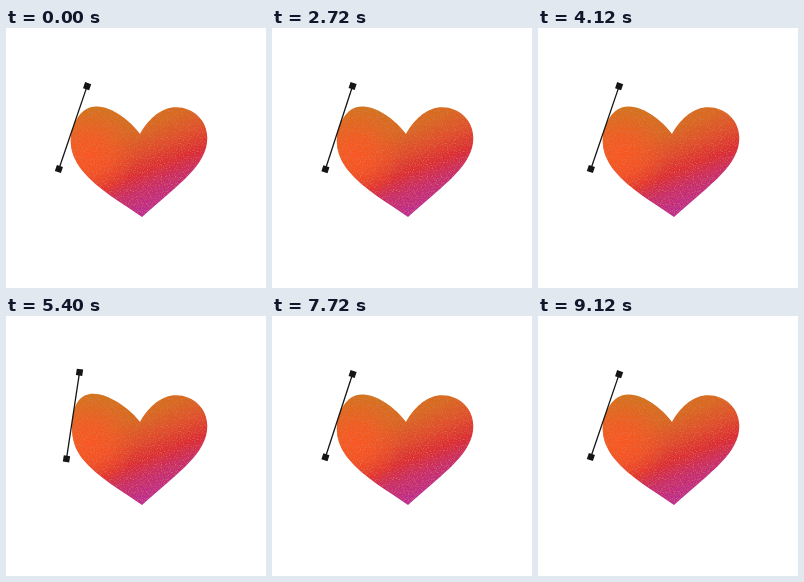
An HTML page that plays this animation: 260x260 px, repeating every 10000 ms.

```html
<!DOCTYPE html>
<html lang="en">
<head>
<meta charset="utf-8">
<title>Heart curve handle</title>
<style>
html, body { margin: 0; width: 100%; height: 100%; overflow: hidden; background: #fff; }
svg { display: block; width: 100vw; height: 100vh; }
</style>
</head>
<body>
<svg viewBox="0 0 260 260">
  <defs>
    <linearGradient id="warm" gradientUnits="userSpaceOnUse" x1="110" y1="72" x2="153.7" y2="181.7">
      <stop offset="0" stop-color="#d2741a"/>
      <stop offset=".3" stop-color="#d8691e"/>
      <stop offset=".48" stop-color="#e04e28"/>
      <stop offset=".65" stop-color="#dc2c32"/>
      <stop offset=".8" stop-color="#c82c6c"/>
      <stop offset="1" stop-color="#bb2c98"/>
    </linearGradient>
    <radialGradient id="glow" gradientUnits="userSpaceOnUse" cx="82" cy="127" r="48">
      <stop offset="0" stop-color="#ff5420" stop-opacity=".9"/>
      <stop offset=".4" stop-color="#ff5420" stop-opacity=".65"/>
      <stop offset="1" stop-color="#ff5420" stop-opacity="0"/>
    </radialGradient>
    <filter id="noise" x="0" y="0" width="1" height="1" color-interpolation-filters="sRGB">
      <feTurbulence type="fractalNoise" baseFrequency=".85" numOctaves="2" seed="7"/>
      <feColorMatrix values="0 0 0 0 .85  0 0 0 0 .5  0 0 0 0 .4  2 0 0 0 -.95"/>
    </filter>
    <clipPath id="clip"><path id="edge"/></clipPath>
  </defs>
  <g clip-path="url(#clip)">
    <rect x="50" y="65" width="160" height="130" fill="url(#warm)"/>
    <rect x="50" y="65" width="160" height="130" fill="url(#glow)"/>
    <rect x="50" y="65" width="160" height="130" filter="url(#noise)"/>
  </g>
  <g id="handle" fill="#151515">
    <path d="M0-43.8V43.8" stroke="#151515" stroke-width="1.3"/>
    <rect x="-3.2" y="-47" width="6.4" height="6.4"/>
    <rect x="-3.2" y="40.6" width="6.4" height="6.4"/>
  </g>
</svg>
<script>
const LOOP = 5000, CX = 67, CY = 99.6, ARM = 43.8;
const REST = 18.8, SETTLED = 18;

// [time in ms, handle angle in degrees]
const keys = [
  [0, REST], [1000, -10.7], [1400, REST], [1490, SETTLED],
  [2690, SETTLED], [3660, 49], [4130, REST], [LOOP, REST]
];

const $ = id => document.getElementById(id);
const edge = $('edge'), handle = $('handle');
const ease = u => (1 - Math.cos(Math.PI * u)) / 2;

function angleAt(t) {
  const i = keys.findIndex(k => k[0] > t);
  const [t0, a] = keys[i - 1], [t1, b] = keys[i];
  return a + (b - a) * ease((t - t0) / (t1 - t0));
}

function draw(t) {
  const angle = angleAt(t), rad = angle * Math.PI / 180;
  const dx = ARM * Math.sin(rad), dy = -ARM * Math.cos(rad);
  // the lower arm pulls only the short side of the heart
  const lx = CX - dx * .4, ly = CY - dy * .4;
  edge.setAttribute('d', `M${CX} ${CY}C${CX + dx} ${CY + dy} 121 87.5 134 106`
    + 'C143 90 156 79.3 170 79.3C188 79.3 201.3 93 201.3 110C201.3 137 173 156 136 189'
    + `C117.4 175.8 91.4 161.2 76.5 142.7C66.8 130.4 ${lx} ${ly} ${CX} ${CY}Z`);
  handle.setAttribute('transform', `translate(${CX} ${CY}) rotate(${angle})`);
}

function tick() {
  draw(performance.now() % LOOP);
  requestAnimationFrame(tick);
}
tick();
</script>
</body>
</html>
```
